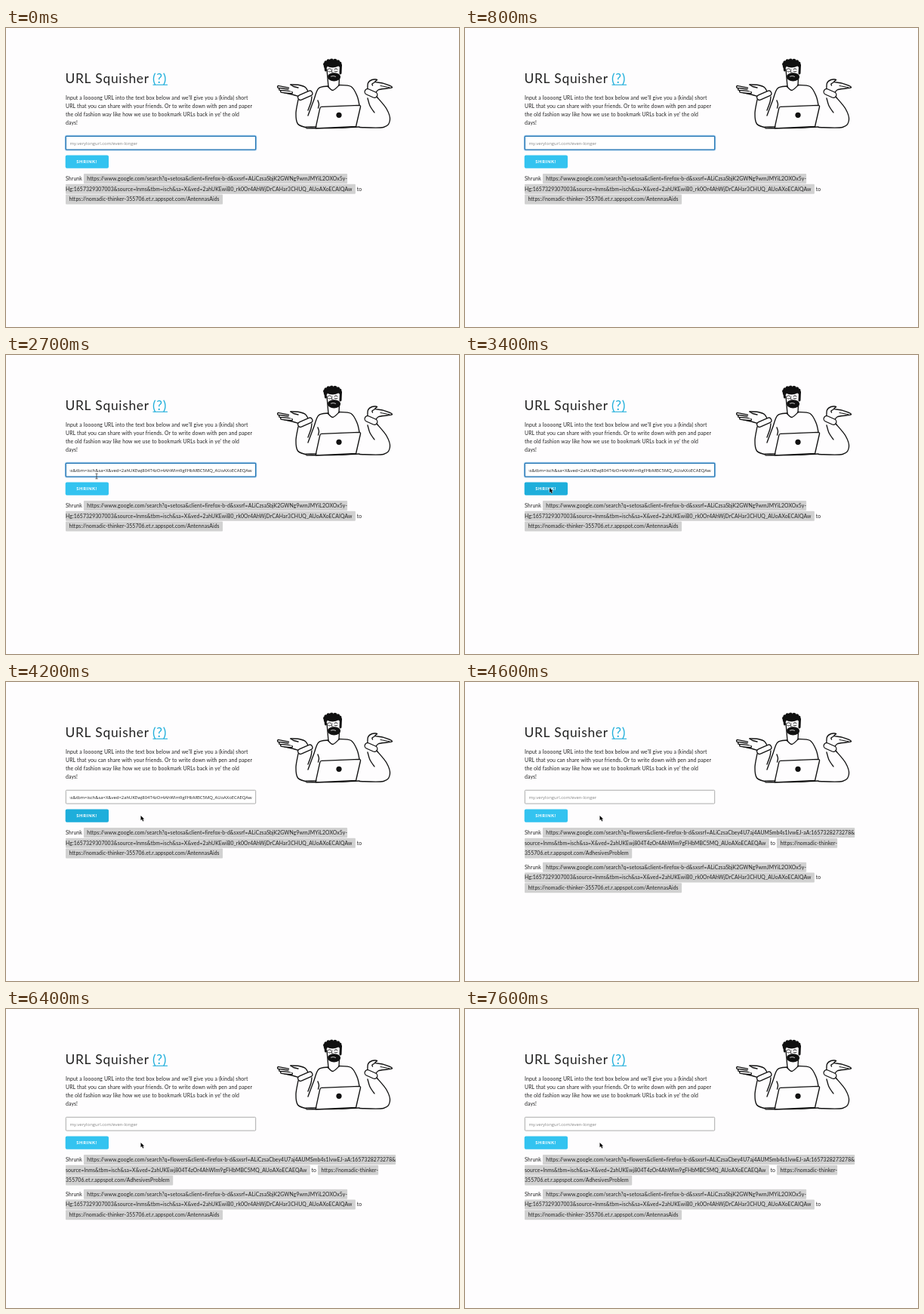
An HTML page with a canvas that plays this animation: 600 px wide and 396 px high, repeating every 7700 ms.

```html
<!DOCTYPE html>
<html lang="en">
<head>
<meta charset="utf-8">
<title>URL Squisher</title>
<style>
html, body { margin: 0; width: 100%; height: 100%; overflow: hidden; background: #fefdfe; }
canvas { display: block; width: 600px; height: 396px; }
</style>
</head>
<body>
<canvas id="stage"></canvas>
<script>
const LOOP = 7700;
const canvas = document.getElementById('stage');
const ctx = canvas.getContext('2d');
const ratio = window.devicePixelRatio || 1;
canvas.width = 600 * ratio;
canvas.height = 396 * ratio;

const INK = '#222', BLACK = '#111', PAPER = '#fefdfe', LINK = '#1eaedb';
const BODY = 'Lato, "Open Sans", sans-serif';
const FIELD = '"Open Sans", "Noto Sans", sans-serif';
const LEFT = 79, ROW = 13.8, PAD = 4.4;

// Moments in the loop, in ms
const TYPE_AT = 1200, PASTE_AT = 2100, MOUSE_AT = 2400, CLICK_AT = 3500, RESULT_AT = 4600;

const intro = [
  'Input a loooong URL into the text box below and we\'ll give you a (kinda) short',
  'URL that you can share with your friends. Or to write down with pen and paper',
  'the old fashion way like how we use to bookmark URLs back in ye\' the old',
  'days!'
];
const pasted = 'nms&tbm=isch&sa=X&ved=2ahUKEwj804T4zOr4AhWIm9gFHbMBC5MQ_AUoAXoECAEQAw';

const search = 'https://www.google.com/search?q=';
const client = '&client=firefox-b-d&sxsrf=ALiCzsa';
const setosa = {
  long: [search + 'setosa' + client + 'SbjK2GWNg9wmJMYiL2OXOx5y-',
    'Hg:1657329307003&source=lnms&tbm=isch&sa=X&ved=2ahUKEwiB0_rk0Or4AhWjDrCAHar3CHUQ_AUoAXoECAIQAw'],
  short: ['', 'https://nomadic-thinker-355706.et.r.appspot.com/AntennasAids']
};
const flowers = {
  long: [search + 'flowers' + client + 'Cbey4U7aj4AUMSmb4s1lvwEJ-aA:1657328273278&',
    'source=l' + pasted],
  short: ['https://nomadic-thinker-', '355706.et.r.appspot.com/AdhesivesProblem']
};

function text(str, x, y, size, color = INK, family = BODY, weight = 400, gap = 0) {
  ctx.font = `${weight} ${size}px ${family}`;
  ctx.letterSpacing = gap + 'px';
  ctx.fillStyle = color;
  ctx.fillText(str, x, y);
  return ctx.measureText(str).width;
}

function box(x, y, w, h, r, fill, line, width = 1) {
  ctx.beginPath();
  ctx.roundRect(x, y, w, h, r);
  if (fill) { ctx.fillStyle = fill; ctx.fill(); }
  if (line) { ctx.strokeStyle = line; ctx.lineWidth = width; ctx.stroke(); }
}

// One shaded link; padding sits only at its outer ends
function code(lines, x, y) {
  lines.forEach((str, i) => {
    if (i) { x = LEFT; y += ROW; }
    if (!str) return;
    const before = i && lines[0] ? 0 : PAD, after = i < lines.length - 1 ? 0 : PAD;
    ctx.font = `400 6.85px ${BODY}`;
    ctx.letterSpacing = '0.11px';
    const w = before + ctx.measureText(str).width + after;
    box(x, y - 8.9, w, 13, 1, '#d1d1d1');
    text(str, x + before, y, 6.85, INK, BODY, 400, .11);
    x += w;
  });
  return x;
}

function entry(urls, y) {
  const x = LEFT + 2 + text('Shrunk', LEFT, y, 6.9, INK, BODY, 400, .12);
  const end = code(urls.long, x, y) + 1.8;
  const to = text('to', end, y + ROW, 6.9);
  code(urls.short, end + to + 2, y + ROW);
}

function header() {
  text('URL Squisher', 78.5, 73.3, 17.4, INK, BODY, 400, .7);
  text('(?)', 194, 73.3, 17.4, LINK, BODY, 400, .6);
  ctx.fillRect(194.5, 74.7, 19.5, 1.1);
  intro.forEach((line, i) => text(line, LEFT, 95 + i * 11, 6.9, INK, BODY, 400, .1));
}

function field(t) {
  const focused = t < CLICK_AT;
  if (focused) box(79, 143, 252, 18.4, 1.5, null, 'rgba(60,150,220,.45)', 2.4);
  box(79.3, 143.3, 251.4, 17.8, 1, '#fff', focused ? '#2274b2' : '#a3a3a3', focused ? 1.3 : .9);
  if (t >= PASTE_AT && t < RESULT_AT) {
    ctx.save();
    ctx.beginPath();
    ctx.rect(84.5, 144, 241.5, 16);
    ctx.clip();
    ctx.textAlign = 'right';
    text(pasted, 325.5, 154.5, 5.9, INK, FIELD);
    ctx.restore();
  } else if (t >= TYPE_AT && t < PASTE_AT) {
    const typed = 'https'.slice(0, 1 + Math.floor((t - TYPE_AT) / 100));
    const w = text(typed, 84.5, 154.5, 5.9, INK, FIELD);
    ctx.fillRect(84.7 + w, 148.7, .6, 7.2);
  } else {
    text('my.verylongurl.com/even-longer', 84.5, 154.5, 5.95, '#858585', FIELD);
  }
}

function button(t) {
  const dark = t >= CLICK_AT - 250 && t < RESULT_AT;
  box(78.7, 168.4, 57.3, 17.4, 2, dark ? LINK : '#33c3f0');
  text('SHRINK!', 93.3, 179.3, 5.8, '#fff', BODY, 800, .6);
}

const ease = p => p * p * (3 - 2 * p);
const part = (t, a, b) => ease(Math.min(1, Math.max(0, (t - a) / (b - a))));

function mouse(t) {
  if (t < MOUSE_AT) return;
  const down = part(t, 2800, 3250), away = part(t, 3650, 4100);
  const x = 120 - 8 * down + 66.5 * away, y = 160.5 + 15.5 * down + away;
  ctx.save();
  ctx.translate(x, y);
  if (y < 162) {
    ctx.strokeStyle = '#333';
    ctx.lineWidth = .8;
    ctx.stroke(new Path2D('M-1.5 -3.3H1.5M0 -3V3M-1.5 3.3H1.5'));
  } else {
    const arrow = new Path2D('M0 0V6.2L1.5 4.8L2.7 7.5L3.9 7L2.7 4.4H4.6Z');
    ctx.strokeStyle = '#fff';
    ctx.lineWidth = .9;
    ctx.stroke(arrow);
    ctx.fillStyle = '#000';
    ctx.fill(arrow);
  }
  ctx.restore();
}

// Trace a smooth line through x,y pairs
function trace(coords) {
  const n = coords.length / 2 - 1;
  const at = i => {
    const k = 2 * Math.min(n, Math.max(0, i));
    return [coords[k], coords[k + 1]];
  };
  ctx.beginPath();
  ctx.moveTo(...at(0));
  for (let i = 0; i < n; i++) {
    const [a, b, c, d] = [-1, 0, 1, 2].map(k => at(i + k));
    ctx.bezierCurveTo(b[0] + (c[0] - a[0]) / 6, b[1] + (c[1] - a[1]) / 6,
      c[0] - (d[0] - b[0]) / 6, c[1] - (d[1] - b[1]) / 6, c[0], c[1]);
  }
}

function pen(width, color, ...coords) {
  trace(coords);
  ctx.strokeStyle = color;
  ctx.lineWidth = width;
  ctx.stroke();
}

const line = (...coords) => pen(1.35, BLACK, ...coords);

// Outlined tube with round ends
function tube(width, ...coords) {
  pen(width, BLACK, ...coords);
  pen(width - 2.6, PAPER, ...coords);
}

function dot(x, y, rx, ry = rx, fill = BLACK) {
  ctx.beginPath();
  ctx.ellipse(x, y, rx, ry, 0, 0, 7);
  ctx.fillStyle = fill;
  ctx.fill();
}

function head() {
  dot(434, 57, 9.5, 12, PAPER);
  line(425, 55, 426, 66, 427, 78);
  line(441.5, 66, 441, 76);
  // curls
  dot(432.5, 47.5, 9.5, 5);
  for (let i = 0; i < 9; i++) {
    const a = 2.75 + i * .46;
    dot(432.5 + 10 * Math.cos(a), 48.5 + 5.8 * Math.sin(a), 2.5, 2.3);
  }
  pen(3, BLACK, 422.8, 50, 423.5, 56);
  pen(3, BLACK, 443.5, 49, 443, 60);
  // beard and mouth
  dot(434.5, 64.8, 8.6, 5.6);
  pen(.8, PAPER, 430.5, 64.2, 433.5, 63.6, 436.5, 64.4);
  // brows, eyes and nose
  for (const x of [428.5, 437]) {
    pen(1, BLACK, x - 2, 54.8, x, 53.8, x + 2, 54.8);
    pen(.9, BLACK, x - 1.8, 57.2, x, 58, x + 1.8, 57.2);
  }
  pen(.9, BLACK, 432, 55, 431.3, 58.6, 433, 59);
}

function leftArm() {
  line(387, 95, 384, 113, 386.5, 127, 398, 132);
  line(405, 91, 404, 98, 400, 109);
  // hand: thumb, palm and three fingers
  line(377, 75, 388, 75.5, 397, 79, 401, 87);
  line(368, 85.5, 379, 88, 389, 91);
  for (let i = 0; i < 3; i++)
    tube(4.2, 361 + 2 * i, 78 + 3 * i, 374 + 2 * i, 80.5 + 2.4 * i);
  pen(5, PAPER, 377, 81, 389, 84);
  line(377, 75, 381, 77.5, 387, 79);
  tube(8, 390, 92, 402.5, 86.5);
}

function rightArm() {
  line(491, 91, 504, 107, 508.5, 122, 500, 131.5, 468, 131.5);
  line(479, 93, 482, 103, 488, 112);
  // hand held flat
  line(479, 84, 479.5, 73, 485, 68.5, 491.5, 68.5, 489, 71.5, 500, 73.3, 511.5, 78.3, 505, 80, 493, 82, 489, 88);
  line(489, 71.5, 485, 74, 485.5, 76);
  pen(1, BLACK, 496, 76.5, 508, 78.8);
  tube(9, 479, 84.5, 488, 88.5);
}

function laptop() {
  const lid = new Path2D('M418 104.3L467.5 102.3Q470 102.3 469.5 104.5L463.5 130.5L410 132.8L415.8 106.3Q416.3 104.3 418 104.3Z');
  ctx.fillStyle = PAPER;
  ctx.fill(lid);
  ctx.strokeStyle = BLACK;
  ctx.lineWidth = 1.35;
  ctx.stroke(lid);
  line(397, 131.2, 411, 130.8);
  line(398, 132.8, 440, 132.3, 468, 131);
  dot(441, 115.3, 3.6);
}

function man() {
  ctx.lineJoin = ctx.lineCap = 'round';
  // shoulders, collar and sleeve fold
  line(427, 77, 414, 80, 407.5, 96, 400, 116);
  line(441, 75.5, 457, 77.5, 465, 90, 468, 102);
  line(426.5, 77.5, 433, 82.5, 441.5, 75.5);
  line(413, 96, 414.5, 101, 413.5, 106);
  leftArm();
  rightArm();
  laptop();
  head();
  ctx.lineCap = 'butt';
}

function draw(t) {
  ctx.setTransform(ratio, 0, 0, ratio, 0, 0);
  ctx.fillStyle = PAPER;
  ctx.fillRect(0, 0, 600, 396);
  header();
  man();
  field(t);
  button(t);
  const entries = t >= RESULT_AT ? [flowers, setosa] : [setosa];
  entries.forEach((urls, i) => entry(urls, 201.8 + i * 45.8));
  mouse(t);
}

const start = performance.now();
function tick() {
  draw((performance.now() - start) % LOOP);
  requestAnimationFrame(tick);
}
tick();
</script>
</body>
</html>
```
